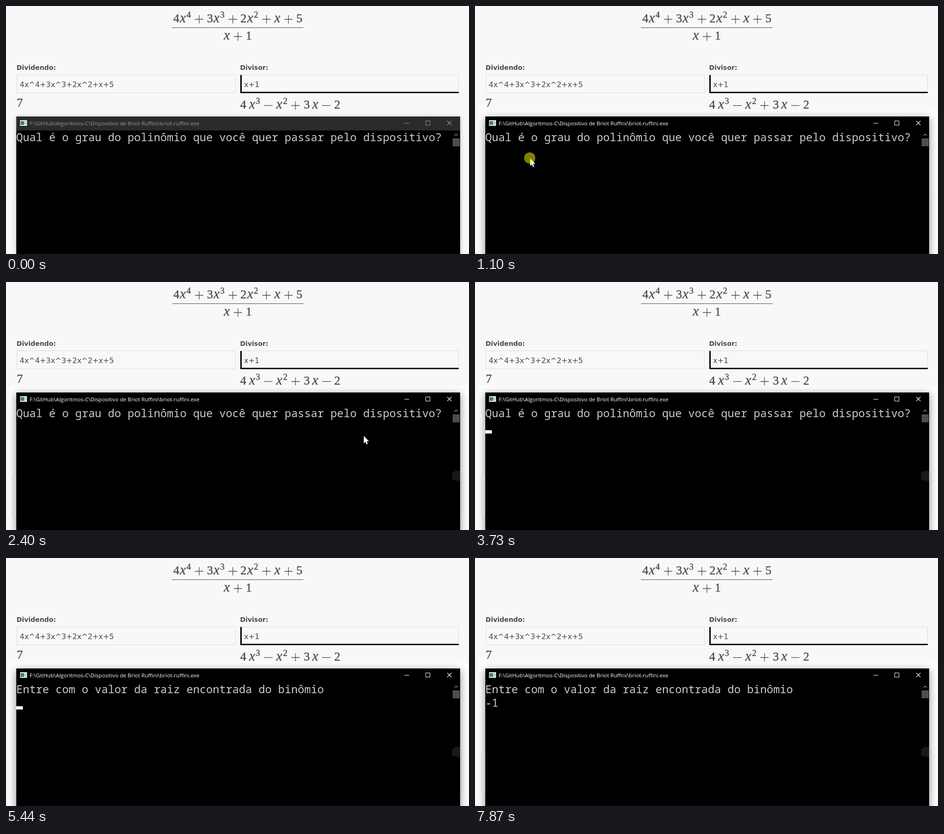
These frames come from a looping animation (990x532 px, 8 s). An HTML page with a canvas:

```html
<!DOCTYPE html>
<html lang="pt">
<head>
<meta charset="utf-8">
<title>Briot-Ruffini</title>
<style>
html, body { margin: 0; width: 100%; height: 100%; overflow: hidden; background: #f8f8f8; }
canvas { display: block; }
</style>
</head>
<body>
<canvas id="stage" width="990" height="532"></canvas>
<script>
const ctx = document.getElementById('stage').getContext('2d');
const LOOP = 8000;
const INK = '#4a4a4a';
const MONO = '23.333px "Noto Sans Mono", monospace';
const BLOCK_ON = [[1600, 2130], [2660, 3190], [3730, 4250], [4740, 5260],
                  [5410, 6320], [6830, 7330], [7430, 7870]];

function rect(x, y, w, h, color) {
  ctx.fillStyle = color;
  ctx.fillRect(x, y, w, h);
}

function frame(x, y, w, h, color) {
  ctx.strokeStyle = color;
  ctx.lineWidth = 1;
  ctx.strokeRect(x + .5, y + .5, w - 1, h - 1);
}

// A thin outline of the given weight thickens light faces.
function text(str, x, y, font, color, weight = 0) {
  ctx.font = font;
  ctx.fillStyle = ctx.strokeStyle = color;
  ctx.fillText(str, x, y);
  if (weight) {
    ctx.lineWidth = weight;
    ctx.strokeText(str, x, y);
  }
}

function lines(points, color, width = 1) {
  ctx.strokeStyle = color;
  ctx.lineWidth = width;
  ctx.beginPath();
  for (const [x1, y1, x2, y2] of points) {
    ctx.moveTo(x1, y1);
    ctx.lineTo(x2, y2);
  }
  ctx.stroke();
}

function polygon(points, color) {
  ctx.fillStyle = color;
  ctx.beginPath();
  points.forEach(([x, y]) => ctx.lineTo(x, y));
  ctx.fill();
}

// Each token is a symbol followed by its left edge; ^ marks an exponent.
function math(spec, baseline) {
  const serif = '"Liberation Serif", serif';
  for (const token of spec.split(' ')) {
    const [, symbol, left] = token.match(/^(\^?.)@(.+)$/);
    const x = +left, mid = baseline - 6.5;
    if (symbol === '+' || symbol === '-') {
      const bars = [[x, mid, x + 18, mid]];
      if (symbol === '+') bars.push([x + 9, mid - 9, x + 9, mid + 9]);
      lines(bars, INK, 1.3);
    } else if (symbol === 'x') {
      text('x', x + .8, baseline, 'italic 29px ' + serif, INK, .3);
    } else if (symbol[0] === '^') {
      text(symbol[1], x, baseline - 10, '18.6px ' + serif, INK, .4);
    } else {
      text(symbol, x, baseline, '26px ' + serif, INK, .4);
    }
  }
}

function drawPage() {
  rect(0, 0, 990, 532, '#f8f8f8');
  math('4@357.8 x@371 ^4@386 +@404 3@429.8 x@443 ^3@458 +@476 2@501.3 x@515 ^2@530 +@548 x@573 +@595 5@620.8', 35);
  rect(355, 46, 281, 1, INK);
  math('x@465 +@487 1@512.8', 72);

  const label = 'bold 13.9px "DejaVu Sans", sans-serif';
  const field = '15.9px "DejaVu Sans", sans-serif';
  text('Dividendo:', 22.5, 137, label, INK);
  text('Divisor:', 500.5, 137, label, INK);
  frame(23, 147, 468, 40, '#dcdcdc');
  frame(501, 147, 467, 40, '#dcdcdc');
  rect(501, 148, 3, 39, '#000');
  rect(501, 184, 467, 3, '#000');
  text('4x^4+3x^3+2x^2+x+5', 29.3, 174, field, INK);
  text('x+1', 509, 174, field, INK);

  math('7@23', 216);
  math('4@500.8 x@519 ^3@534 -@552 x@577 ^2@592.5 +@610 3@636.8 x@654 -@676 2@701.8', 220);
}

function drawShadow(active) {
  if (active) {
    ctx.fillStyle = '#fdfdfd';
    ctx.beginPath();
    ctx.roundRect(5, 222, 984, 340, 12);
    ctx.fill();
  }
  ctx.save();
  ctx.shadowColor = active ? 'rgba(0,0,0,.45)' : 'rgba(0,0,0,.25)';
  ctx.shadowBlur = active ? 17 : 9;
  ctx.shadowOffsetY = active ? 4 : 1;
  rect(22, 237, 949, 330, '#000');
  ctx.restore();
  ctx.strokeStyle = 'rgba(0,0,0,.1)';
  ctx.lineWidth = 1;
  ctx.beginPath();
  ctx.roundRect(13.5, 408.5, 961, 100, 8);
  ctx.stroke();
}

function drawWindow(active) {
  const tone = active ? '#fff' : '#999';
  drawShadow(active);
  rect(22, 237, 949, 300, '#000');
  if (!active) rect(22, 237, 949, 30, '#2b2b2b');

  rect(30, 245, 15, 12, '#f2f2f2');
  rect(31, 247, 8, 8, '#3d7d86');
  rect(40, 247, 4, 8, '#c9c9c9');
  text('F:\\GitHub\\Algoritmos-C\\Dispositivo de Briot Ruffini\\briot-ruffini.exe',
    50.5, 256, '11.65px "Open Sans", sans-serif', tone);
  rect(852, 251, 10, 1, tone);
  frame(897, 246, 10, 10, tone);
  lines([[943.5, 246.5, 952.5, 255.5], [952.5, 246.5, 943.5, 255.5]], tone, 1.1);

  lines([[959, 278, 962.5, 274.5], [962.5, 274.5, 966, 278]], '#8a8a8a', 1.5);
  rect(955, 284, 15, 17, '#4d4d4d');
}

function drawConsole(t) {
  const prompt = t < 5440
    ? 'Qual é o grau do polinômio que você quer passar pelo dispositivo?'
    : 'Entre com o valor da raiz encontrada do binômio';
  const typed = t < 4870 ? '' : t < 5440 ? '4' : t < 7030 ? '' : t < 7430 ? '-' : '-1';
  text(prompt, 22, 290, MONO, '#ccc');
  text(typed, 22, 319, MONO, '#ccc');
  if (BLOCK_ON.some(([from, to]) => t >= from && t < to)) {
    const newline = t >= 5410 && t < 5440;
    rect(newline ? 22 : 22 + 14 * typed.length, newline ? 347 : 318, 14, 7, '#fff');
  }
  if (t >= 1780) {
    polygon([[954, 407], [957, 410], [960, 405], [971, 405], [971, 427], [968, 429],
             [965, 424], [963, 428], [959, 423], [957, 427], [954, 424]], '#191919');
  }
}

function progress(t, from, to) {
  return Math.min(1, Math.max(0, (t - from) / (to - from)));
}

function pointerAt(t) {
  if (t < 420 || (t >= 1850 && t < 1950) || t >= 2660) return null;
  if (t < 1170) {
    const left = 1 - Math.sin(progress(t, 420, 950) * Math.PI / 2);
    return [118 + 793 * left, 327 + 92 * left];
  }
  if (t < 1850) {
    const p = (1 - Math.cos(progress(t, 1170, 1740) * Math.PI)) / 2;
    return [118 + 844 * p, 327 + 81 * p];
  }
  const swing = Math.sin(progress(t, 1950, 2650) * Math.PI);
  return [934 - 188 * swing, 403 - 81 * swing];
}

function drawPointer(t) {
  const tip = pointerAt(t);
  if (!tip) return;
  const [x, y] = tip;
  const arrow = [[0, 0], [0, 16], [3.6, 12.6], [6, 18], [8.6, 17], [6.2, 11.6], [11, 11.4]];
  polygon(arrow.map(([dx, dy]) => [x + dx, y + dy]), '#fff');
  if (t >= 1100 && t < 1200) {
    ctx.fillStyle = 'rgba(255,255,0,.5)';
    ctx.beginPath();
    ctx.arc(x - 1, y - 1, 12, 0, Math.PI * 2);
    ctx.fill();
  }
}

const start = performance.now();

function draw() {
  const t = (performance.now() - start) % LOOP;
  drawPage();
  drawWindow(t >= 1100);
  drawConsole(t);
  drawPointer(t);
  requestAnimationFrame(draw);
}
draw();
</script>
</body>
</html>
```
